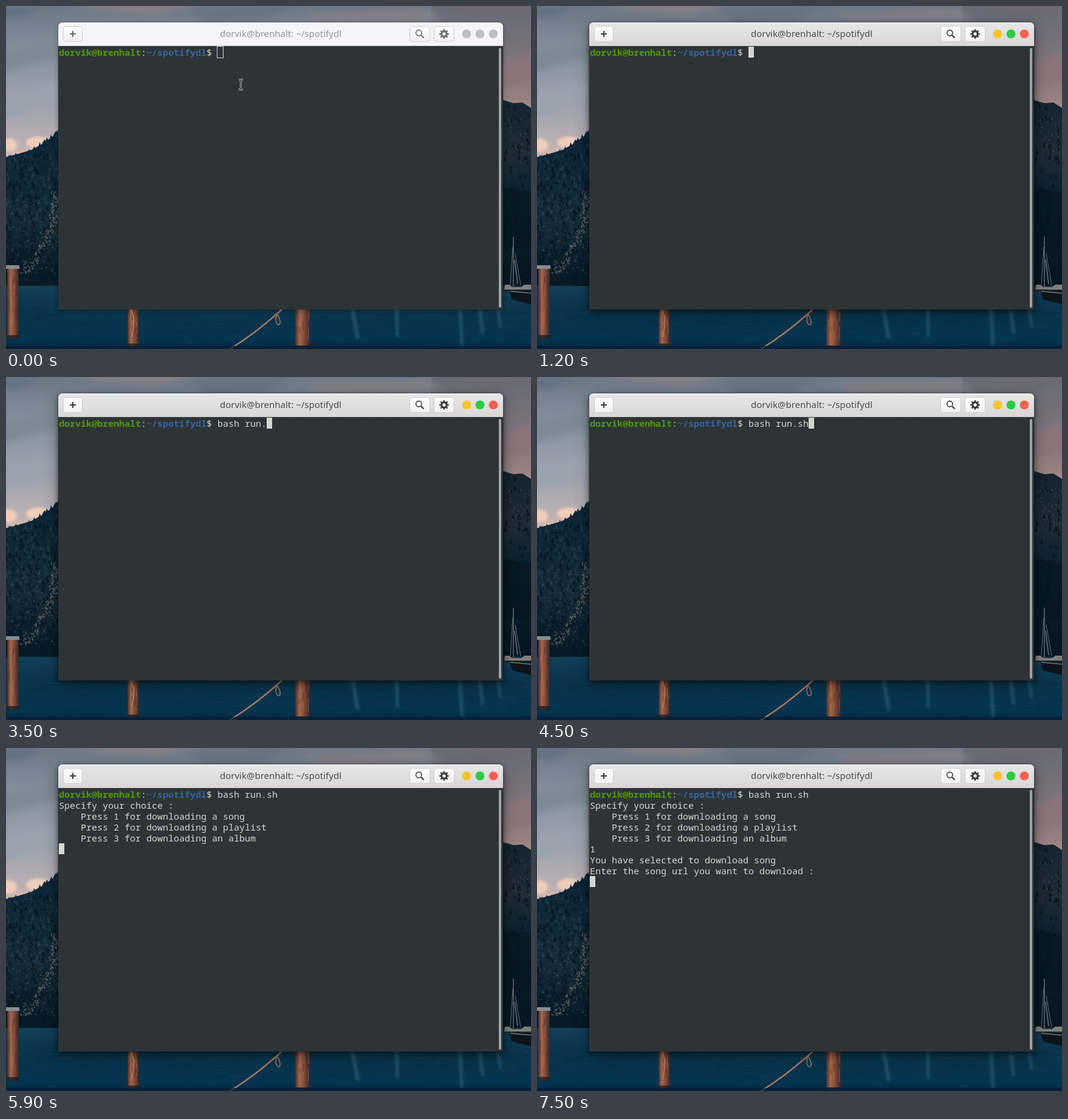
Animation of 864x565 px, one loop 8000 ms. Source, as an HTML page:

```html
<!DOCTYPE html>
<html lang="en">
<head>
<meta charset="utf-8">
<title>Terminal session</title>
<style>
  html, body { margin: 0; width: 100%; height: 100%; overflow: hidden; background: #0a3349; }
  #stage { position: absolute; left: 0; top: 0; width: 864px; height: 565px; overflow: hidden; }
  svg { position: absolute; left: 0; top: 0; display: block; }
  .shadow { position: absolute; left: 86px; top: 27px; width: 732px; height: 473px; border-radius: 8px 8px 0 0; }
  #idle { box-shadow: 0 2px 6px 2px rgba(0,0,0,.2), 0 0 0 1px rgba(0,0,0,.14); }
  #active { box-shadow: 0 3px 9px 1px rgba(0,0,0,.45), 0 6px 26px 2px rgba(0,0,0,.22), 0 0 0 1px rgba(0,0,0,.18); }
  #title { font: 15px "Noto Sans", "Open Sans", sans-serif; fill: #444; text-anchor: middle; }
  #term text { font: 15px "Noto Sans Mono", "DejaVu Sans Mono", monospace; fill: #d3d7cf; white-space: pre; }
  #term .user, #term .path { font-weight: 700; }
  #term .user { fill: #4e9a06; }
  #term .path { fill: #3465a4; }
</style>
</head>
<body>
<div id="stage">
  <svg id="photo" width="864" height="565" viewBox="0 0 864 565">
    <defs>
      <linearGradient id="sky" x2="0" y2="1">
        <stop offset="0" stop-color="#6d7886"/><stop offset=".35" stop-color="#8a95a3"/>
        <stop offset=".7" stop-color="#a5a6b0"/><stop offset="1" stop-color="#cdb8b4"/>
      </linearGradient>
      <linearGradient id="dusk" x2="0" y2="1">
        <stop offset="0" stop-color="#686c77"/><stop offset=".45" stop-color="#7c747c"/>
        <stop offset=".8" stop-color="#97807f"/><stop offset="1" stop-color="#b59b96"/>
      </linearGradient>
      <linearGradient id="hill" x2="0" y2="1">
        <stop offset="0" stop-color="#0c2638"/><stop offset=".6" stop-color="#152936"/><stop offset="1" stop-color="#081b28"/>
      </linearGradient>
      <linearGradient id="cliff" x2="0" y2="1">
        <stop offset="0" stop-color="#142430"/><stop offset=".3" stop-color="#1d2a35"/>
        <stop offset=".5" stop-color="#0a202e"/><stop offset="1" stop-color="#06151f"/>
      </linearGradient>
      <linearGradient id="water" x2="0" y2="1">
        <stop offset="0" stop-color="#133f58"/><stop offset=".4" stop-color="#09344b"/>
        <stop offset=".85" stop-color="#053450"/><stop offset="1" stop-color="#052740"/>
      </linearGradient>
      <linearGradient id="wood">
        <stop offset="0" stop-color="#46302b"/><stop offset=".3" stop-color="#a3664d"/>
        <stop offset=".65" stop-color="#7a4838"/><stop offset="1" stop-color="#34282a"/>
      </linearGradient>
      <filter id="soft" x="-50%" y="-50%" width="200%" height="200%"><feGaussianBlur stdDeviation="6"/></filter>
      <filter id="haze" x="-50%" y="-50%" width="200%" height="200%"><feGaussianBlur stdDeviation="2"/></filter>
    </defs>
    <rect width="864" height="260" fill="url(#sky)"/>
    <rect x="700" width="164" height="190" fill="url(#dusk)"/>
    <g filter="url(#soft)">
      <path d="M-20 0H60L30 16L-20 22Z" fill="#627183"/>
      <path d="M90 -8H330L250 14L160 8Z" fill="#858188"/>
      <path d="M300 5L480 -5L420 24L330 28Z" fill="#697480"/>
      <path d="M490 12L690 4L720 24L520 30Z" fill="#827f87"/>
      <path d="M700 -8H880V14L780 20Z" fill="#6c6a74"/>
      <path d="M-10 75L90 50V85L-10 110Z" fill="#7e8996"/>
      <path d="M-10 150L90 125V160L-10 185Z" fill="#9aa2ae"/>
      <path d="M815 95L870 75V125L815 130Z" fill="#8b757a"/>
    </g>
    <g filter="url(#haze)" fill="#efcdba">
      <ellipse cx="4" cy="229" rx="14" ry="11"/>
      <ellipse cx="53" cy="225" rx="20" ry="10"/>
      <path d="M15 240L70 232V250H0Z" fill="#d9b8ae"/>
    </g>
    <path d="M0 249L22 243L42 237L60 227L74 217L90 205V462H0Z" fill="url(#hill)"/>
    <path d="M815 154L835 160L850 159L864 168V470H815Z" fill="url(#cliff)"/>
    <path d="M818 300L864 306V400H818Z" fill="#071722" opacity=".75"/>
    <path d="M0 436L40 444L88 432V464H0Z" fill="#081b27" opacity=".8"/>
    <g id="woods"></g>
    <rect y="461" width="864" height="104" fill="url(#water)"/>
    <g id="ripples"></g>
    <g filter="url(#haze)" fill="#5f98aa" opacity=".3">
      <path d="M567 498H573L582 548H576Z"/><path d="M640 498H646V545H642Z"/>
      <path d="M744 498H750L753 560H748Z"/><path d="M777 498H782L787 540H782Z"/>
      <path d="M807 498H812L816 530H812Z"/>
    </g>
    <path d="M818 462H864V470H818Z" fill="#202c31"/>
    <g fill="none" stroke="#8f989c">
      <path d="M835 380V462"/>
      <path d="M838 408L847 460M834 396L830 460" stroke-width=".7"/>
      <path d="M837 418L842 458" stroke-width="2" opacity=".6"/>
    </g>
    <path d="M821 459H828L833 463H848L853 459H864V467H820Z" fill="#80807f"/>
    <path d="M829 469H864V491L846 487L832 483Z" fill="#0c151b"/>
    <path d="M830 470L864 473" stroke="#747978" stroke-width="1.5"/>
    <g id="posts"></g>
    <g fill="none" stroke="#a07158" stroke-linecap="round">
      <path d="M367 566Q410 540 454 500" stroke-width="2.4"/>
      <path d="M446 507C442 518 445 525 449 525C453 523 451 515 447 509" stroke-width="1.6"/>
      <path d="M368 565Q410 539 453 500" stroke="#c99c7c" stroke-width=".7"/>
    </g>
    <rect y="560" width="864" height="5" fill="#071d35" opacity=".7"/>
  </svg>

  <div id="idle" class="shadow"></div>
  <div id="active" class="shadow"></div>

  <svg width="864" height="565" viewBox="0 0 864 565">
    <defs>
      <linearGradient id="bar" x2="0" y2="1">
        <stop offset="0" stop-color="#e8e7e8"/><stop offset="1" stop-color="#d8d6d7"/>
      </linearGradient>
      <linearGradient id="key" x2="0" y2="1">
        <stop offset="0" stop-color="#fdfdfd"/><stop offset="1" stop-color="#f2f1f2"/>
      </linearGradient>
      <path id="head" d="M86 66V35Q86 27 94 27H810Q818 27 818 35V66Z"/>
      <path id="beam" d="M383 121.5H385L386.5 123L388 121.5H390M386.5 123V136M383 137.5H385L386.5 136L388 137.5H390"/>
    </defs>
    <use href="#head" fill="#f5f4f7"/>
    <g class="focus">
      <use href="#head" fill="url(#bar)"/>
      <path d="M93 27.5H811" stroke="#f6f6f6"/>
    </g>
    <path d="M86 65.5H818" stroke="#cfccce"/>
    <g id="keys"></g>
    <g id="icons" fill="none" stroke="#3a3a3a">
      <path d="M105 46H115M110 41V51" stroke-width="2"/>
      <circle cx="679.3" cy="44.3" r="4.7" stroke-width="1.6"/>
      <path d="M683 48L687.5 52.5" stroke-width="2.2"/>
      <circle cx="721" cy="46" r="4.3" stroke-width="3.2"/>
      <circle cx="721" cy="46" r="6.7" stroke-width="2.2" pathLength="16" stroke-dasharray="1 1" stroke-dashoffset=".5"/>
    </g>
    <text id="title" x="452" y="51">dorvik@brenhalt: ~/spotifydl</text>
    <g id="dots"></g>
    <rect x="86" y="66" width="732" height="434" fill="#2e3436"/>
    <rect x="811" y="69" width="4" height="428" rx="2" fill="#a2a5a4"/>
    <g id="term"></g>
    <rect id="block" width="9" height="18" fill="#d3d7cf"/>
    <rect id="hollow" x="347.5" y="66.5" width="10" height="19" fill="none" stroke="#d3d7cf"/>
    <g id="mouse" fill="none">
      <use href="#beam" stroke="#b9bcbc" stroke-width="2.8"/>
      <use href="#beam" stroke="#24292b" stroke-width="1.2"/>
    </g>
  </svg>
</div>
<script>
const $ = id => document.getElementById(id);
const LOOP = 8000, CELL = 9, ROW = 18, LEFT = 87, TOP = 67;

function add(parent, tag, attrs, text) {
  const el = document.createElementNS("http://www.w3.org/2000/svg", tag);
  for (const k in attrs) el.setAttribute(k, attrs[k]);
  if (text) el.textContent = text;
  parent.appendChild(el);
  return el;
}

let seed = 41;
const rnd = (a = 0, b = 1) => {
  seed = (seed * 16807) % 2147483647;
  return a + (b - a) * seed / 2147483647;
};
const scatter = (id, n, fill, make, opacity = 1) => {
  let d = "";
  for (let i = 0; i < n; i++) d += make();
  add($(id), "path", { d, fill, opacity });
};

// Firs on the slopes, a pale scree run down to the shore, short strokes on the lake.
const ridge = x => x > 200 ? 158 + (x - 819) * .2 : 249 - x * .1 - x * x * .0046;
const fir = (x, y, h) => `M${x.toFixed(1)} ${(y - h).toFixed(1)}l${h * .3} ${h}h${-h * .6}Z`;
const slope = (x0, x1, low) => () => {
  const x = rnd(x0, x1), y = ridge(x), h = rnd(4, 11);
  return fir(x, y + h + rnd(0, low - y - h), h);
};
const chip = (x, y) => `M${x.toFixed(1)} ${y.toFixed(1)}l${rnd(1, 3)} ${rnd(-3, 0)}l${rnd(0, 2)} ${rnd(2, 5)}Z`;
const scree = () => {
  const u = rnd();
  return chip(80 - 52 * u ** 2.5 + rnd(-7, 7), 300 + 140 * u);
};
scatter("woods", 36, "#0c2638", () => { const x = rnd(0, 88); return fir(x, ridge(x) + 4, rnd(5, 9)); });
scatter("woods", 220, "#071925", slope(0, 88, 440), .85);
scatter("woods", 110, "#23404f", slope(0, 88, 370), .55);
scatter("woods", 130, "#4d5153", () => chip(rnd(0, 86), rnd(315, 440)), .65);
scatter("woods", 150, "#77736f", scree, .75);
scatter("woods", 70, "#071925", () => fir(rnd(0, 88), rnd(400, 460), rnd(6, 12)), .75);
scatter("woods", 70, "#08161f", slope(819, 864, 440), .8);
scatter("woods", 50, "#514a4c", () => chip(rnd(826, 862), rnd(185, 245)), .55);
const wave = (y0, y1) => () => {
  const w = rnd(5, 25);
  return `M${rnd(0, 864).toFixed(1)} ${rnd(y0, y1).toFixed(1)}h${w}v1h${-w}Z`;
};
scatter("ripples", 130, "#24586f", wave(463, 558), .22);
scatter("ripples", 120, "#04263c", wave(480, 560), .35);

for (const [x, y, w, h] of [[2, 430, 19, 118], [200, 490, 19, 72], [476, 490, 24, 75]]) {
  add($("posts"), "rect", { x, y, width: w, height: h, fill: "url(#wood)" });
  for (let i = 0; i < 14; i++)
    add($("posts"), "rect", {
      x: x + rnd(1, w - 2), y: y + rnd(0, h - 26), width: 1, height: rnd(8, 25),
      fill: i % 2 ? "#352523" : "#b77859", opacity: .5
    });
  add($("posts"), "rect", { x, y: y + h - 6, width: w, height: 6, fill: "#151c22", opacity: .75 });
}
add($("posts"), "rect", { x: 0, y: 427, width: 22, height: 6, fill: "#858c90" });
add($("posts"), "path", { d: "M206 500L211 516L207 545", fill: "none", stroke: "#bc9783" });

for (const [x, w] of [[94, 32], [664, 34], [704, 34]])
  add($("keys"), "rect", { x: x + .5, y: 33.5, width: w - 1, height: 25, rx: 4, fill: "url(#key)", stroke: "#cfcbcc" });
["#fac52b", "#28ce40", "#fc6052"].forEach((fill, i) => {
  const dot = { cx: 758 + i * 22, cy: 46, r: 7.3 };
  add($("dots"), "circle", { ...dot, fill: "#bdbec0" });
  add($("dots"), "circle", { ...dot, fill, class: "focus" });
});

const rows = Array.from({ length: 8 }, (_, i) => add($("term"), "text", { x: LEFT, y: TOP + 15 + i * ROW }));
[["dorvik@brenhalt", "user"], [":", ""], ["~/spotifydl", "path"], ["$ ", ""]]
  .forEach(([s, c]) => add(rows[0], "tspan", { class: c }, s));
const command = add(rows[0], "tspan", {});

const line = "bash run.sh";
const menu = ["Specify your choice :", "    Press 1 for downloading a song",
  "    Press 2 for downloading a playlist", "    Press 3 for downloading an album"];
const reply = ["1", "You have selected to download song", "Enter the song url you want to download :"];

// [time, typed letters, output lines, cursor column, cursor row, cursor lit]
const steps = [
  [0, 0, [], 29, 0, 1], [900, 0, [], 29, 0, 0], [1200, 0, [], 29, 0, 1],
  ...[[1300, 1], [1500, 3], [2000, 4], [2300, 5], [2500, 6], [3000, 7], [3200, 8], [3500, 9]]
    .map(([t, n]) => [t, n, [], 29 + n, 0, 1]),
  [3800, 9, [], 38, 0, 0], [4200, 10, [], 39, 0, 1], [4500, 11, [], 40, 0, 1],
  [5000, 11, menu, 0, 5, 1], [5500, 11, menu, 0, 5, 0], [5900, 11, menu, 0, 5, 1],
  [6500, 11, [...menu, "1"], 1, 5, 1], [6900, 11, [...menu, "1"], 1, 5, 0],
  [7400, 11, [...menu, "1"], 1, 5, 1], [7500, 11, [...menu, ...reply], 0, 8, 1]
];

const faders = [...document.querySelectorAll(".focus"), $("active")];
let last = "";

function render(t) {
  const step = steps.filter(s => s[0] <= t).pop();
  const focus = t < 300 ? 0 : t < 400 ? .6 : 1;
  const mark = step[0] + "/" + focus;
  if (mark === last) return;
  last = mark;
  const [, typed, output, col, row, lit] = step;
  command.textContent = line.slice(0, typed);
  for (let i = 1; i < rows.length; i++) rows[i].textContent = output[i - 1] || "";
  $("block").setAttribute("x", LEFT + col * CELL);
  $("block").setAttribute("y", TOP + row * ROW);
  $("block").style.opacity = lit && focus ? 1 : 0;
  $("hollow").style.opacity = focus ? 0 : 1;
  faders.forEach(el => el.style.opacity = focus);
  $("idle").style.opacity = 1 - focus;
  $("title").style.opacity = .55 + .4 * focus;
  $("icons").style.opacity = .75 + .25 * focus;
  $("mouse").style.opacity = t < 1200 ? 1 : 0;
}

const start = performance.now();
function tick(now) {
  render(Math.max(0, now - start) % LOOP);
  requestAnimationFrame(tick);
}
render(0);
requestAnimationFrame(tick);
</script>
</body>
</html>
```
